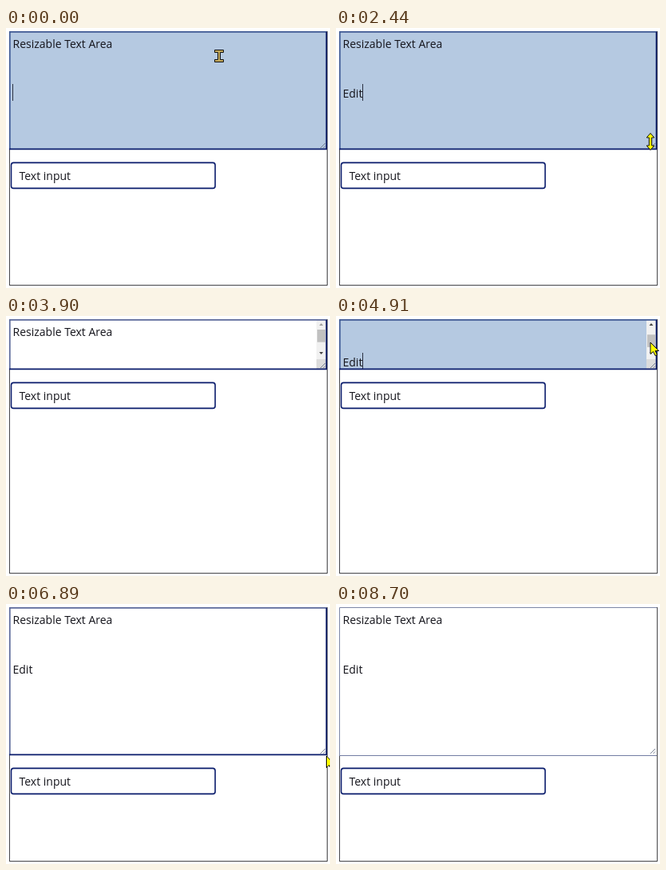
An HTML page that plays this animation: 406x325 px, repeating every 8.77 s.

```html
<!DOCTYPE html>
<html lang="en">
<head>
<meta charset="utf-8">
<title>Resizable text area</title>
<style>
  html, body { margin: 0; width: 100%; height: 100%; overflow: hidden; background: #fff; }
  #stage { display: block; width: 406px; height: 325px; }
  text { font: 14px "Open Sans", "Noto Sans", sans-serif; fill: #15151c; }
  .cursor { fill: #ff0; stroke: #111; stroke-width: 1; }
  .line { fill: none; }
</style>
</head>
<body>
<svg id="stage" viewBox="0 0 406 325">
  <rect x="4.5" y="4.5" width="398" height="317" fill="#fff" stroke="#46464a"/>

  <g id="input">
    <rect x="6.5" y="0.4" width="255.6" height="32" rx="3" fill="#fff" stroke="#0a1c6c" stroke-width="1.6"/>
    <text x="16.5" y="22">Text input</text>
  </g>

  <rect id="area" x="4" y="4" width="398"/>
  <svg id="view" x="0" y="6" width="401" overflow="hidden">
    <g id="content">
      <text x="8.5" y="19">Resizable Text Area</text>
      <text id="typed" x="8.5" y="81"></text>
      <rect id="caret" y="64" width="1" height="21" fill="#2a3040"/>
    </g>
  </svg>
  <g id="scrollbar">
    <rect id="rail" x="389" y="5" width="12" fill="#f1f1f1"/>
    <rect id="thumb" x="390" width="10" fill="#c1c1c1"/>
    <path id="up" d="M392.5 12l2.5-3 2.5 3z"/>
    <path id="down" d="M392.5-1.5l2.5 3 2.5-3z"/>
    <rect id="corner" x="389" width="12" height="12" fill="#dcdcdc"/>
  </g>
  <path id="grip" class="line" d="M394-2l6-6M397.5-2l2.5-2.5" stroke="#6b7488" stroke-width="0.9"/>
  <path id="light" class="line"/>
  <path id="right" class="line" stroke="#0a1c6c" stroke-width="1.7"/>
  <path id="base" class="line"/>

  <g id="pointer">
    <circle id="halo" r="12" fill="#fff000" fill-opacity="0.62"/>
    <path id="ibeam" class="cursor" style="fill:#c4a95c"
      d="M-5.5-7.5H5.5V-4.5H1.5V4.5H5.5V7.5H-5.5V4.5H-1.5V-4.5H-5.5z"/>
    <path id="resize" class="cursor" d="M0-10.5L4.8-5H1.7V5H4.8L0 10.5-4.8 5H-1.7V-5H-4.8z"/>
    <path id="arrow" class="cursor" d="M0 0V14.5L3.5 11.5 6 16.5 8.5 15.5 6 10.5H10.5z"/>
  </g>
</svg>
<script>
const LOOP = 8770, TICK = 70, BLINK = 530, CONTENT = 92;
const el = id => document.getElementById(id);
const set = (id, attrs) => {
  for (const key in attrs) el(id).setAttribute(key, attrs[key]);
};
const show = (id, on) => set(id, { visibility: on ? 'visible' : 'hidden' });

let t = 0;
const during = (from, to) => t >= from && t < to;

// Linear progress from 0 to 1, advanced once per screen tick.
function sweep(from, to) {
  if (t >= to) return 1;
  return Math.max(0, Math.floor((t - from) / TICK) * TICK / (to - from));
}

const shrink = () => sweep(2780, 3330);
const grow = () => sweep(5740, 6560);
const scrolled = () => sweep(4320, 4710);
const pressed = () => during(2710, 3560) || during(4320, 4710) || during(5460, 6820);
const hovered = () => t < 3830 || during(4180, 5600);

// The caret stays lit after activity, then blinks.
function caretLit() {
  const idle = t - (t < 750 ? -330 : t < 4100 ? 1180 : 4980);
  return pressed() || idle < 0 || idle % (2 * BLINK) < BLINK;
}

function pointer() {
  if (t < 2440) {
    const p = sweep(1750, 2240);
    return ['ibeam', 267 + 125 * p, 35 + 104 * p];
  }
  if (t < 3830) return ['resize', 394, 142 - 90 * shrink()];
  if (during(4100, 5460)) {
    const enter = sweep(4100, 4320), leave = sweep(4910, 5260);
    return [leave < 1 ? 'arrow' : 'resize', 404 - 10 * enter, 60 - 33 * enter + 6 * scrolled() + 31 * leave];
  }
  if (during(5460, 6820)) {
    const pull = sweep(5460, 5740);
    return ['resize', 394 + 5 * pull, 64 + 11 * pull + 122 * grow()];
  }
  return [during(6820, 6960) ? 'arrow' : '', 401.5, 190];
}

function drawText() {
  const count = Math.max(0, Math.floor((t - 750) / 100));
  el('typed').textContent = 'Edit'.slice(0, count);
  set('caret', { x: Math.floor(8.5 + el('typed').getComputedTextLength()) });
  show('caret', caretLit() && t < 8700);
}

function drawScrollbar(y, inner, offset) {
  const rail = inner - 12, ratio = (rail - 24) / CONTENT;
  show('scrollbar', inner < CONTENT);
  set('rail', { height: rail + 1 });
  set('thumb', { y: 17 + offset * ratio, height: Math.max(0, inner * ratio) });
  set('up', { fill: offset ? '#444' : '#a0a0a0' });
  set('down', { transform: `translate(0 ${rail - 1.5})`, fill: offset ? '#a0a0a0' : '#444' });
  set('corner', { y: y - 13 });
}

function drawBorder(y) {
  const focused = t < 8700;
  const moving = shrink() > 0 && shrink() < 1;
  set('light', {
    d: focused ? `M4.8 ${y}V4.8H402` : `M4.5 ${y}V4.5H402`,
    stroke: !focused ? '#7d86a5' : hovered() ? '#3f5a94' : '#5c6a9a',
    'stroke-width': focused ? 1.7 : 1
  });
  set('right', { d: `M401.5 5V${y}` });
  show('right', focused);
  set('base', {
    d: `M4 ${focused ? y - 0.6 : y + 0.5}H402`,
    stroke: focused ? '#0a1c6c' : '#737da3',
    'stroke-width': moving ? 3.5 : focused ? 1.7 : 1
  });
}

function drawArea() {
  const y = 152 - 85 * shrink() + 122 * grow(), inner = y - 7;
  const offset = Math.min(24 * scrolled(), Math.max(0, CONTENT - inner));
  set('area', { height: y - 4, fill: hovered() ? '#b5c9e1' : '#fff' });
  set('view', { height: inner });
  set('content', { transform: `translate(0 ${-offset})` });
  set('grip', { transform: `translate(0 ${y})` });
  drawScrollbar(y, inner, offset);
  drawBorder(y);
  // The input follows late when the area shrinks.
  set('input', { transform: `translate(0 ${t < 3210 ? 168 : y + 16})` });
}

function drawPointer() {
  const [kind, x, y] = pointer();
  set('pointer', { transform: `translate(${x} ${y})` });
  for (const name of ['ibeam', 'resize', 'arrow']) show(name, name === kind);
  show('halo', pressed());
  set('resize', { 'fill-opacity': pressed() ? 0.25 : 1 });
}

const start = performance.now();
function frame() {
  t = (performance.now() - start) % LOOP;
  drawText();
  drawArea();
  drawPointer();
  requestAnimationFrame(frame);
}
frame();
</script>
</body>
</html>
```
